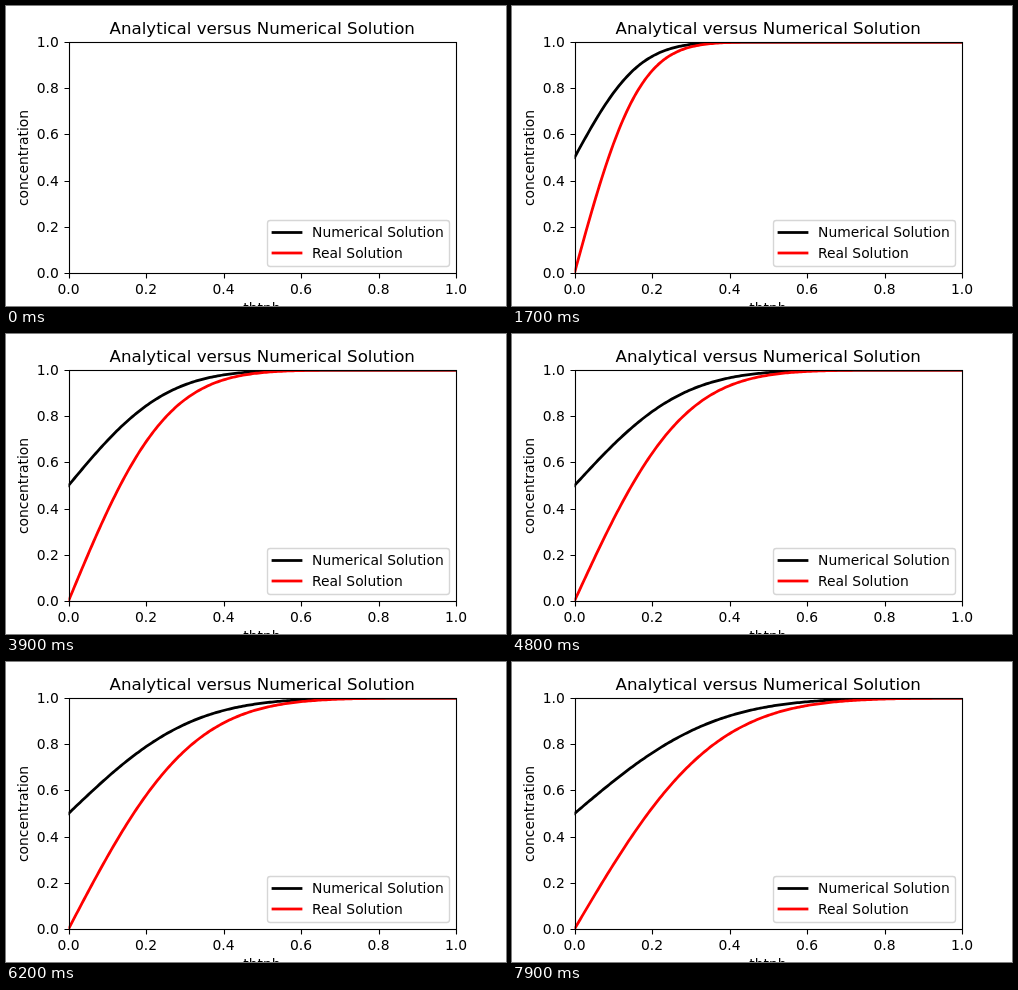
These frames come from a looping animation (500 px wide and 300 px high, 8000 ms). An HTML page:

```html
<!DOCTYPE html>
<html lang="en">
<head>
<meta charset="utf-8">
<title>Analytical versus Numerical Solution</title>
<style>
html, body { margin: 0; width: 100%; height: 100%; overflow: hidden; background: #fff; }
svg { display: block; font: 13.89px "DejaVu Sans", sans-serif; }
.mid { text-anchor: middle; }
.end { text-anchor: end; }
.title { font-size: 16.67px; }
.axis { fill: none; stroke: #000; stroke-width: 1.11; }
.line { fill: none; stroke-width: 2.78; stroke-linecap: square; stroke-linejoin: round; }
.box { fill: #fff; fill-opacity: .8; stroke: #ccc; stroke-opacity: .8; stroke-width: 1.39; }
</style>
</head>
<body>
<svg width="500" height="300" viewBox="0 0 500 300">
  <clipPath id="plot"><rect x="62.5" y="36" width="387.5" height="231"/></clipPath>
  <g clip-path="url(#plot)">
    <path id="numerical" class="line" stroke="#000"/>
    <path id="real" class="line" stroke="#f00"/>
  </g>
  <rect class="axis" x="63.5" y="36.5" width="387" height="231"/>
  <g id="ticks"></g>
  <text class="mid title" x="256.25" y="28">Analytical versus Numerical Solution</text>
  <text class="mid" x="256" y="307">thtnh</text>
  <text class="mid" transform="translate(22 152) rotate(-90)">concentration</text>
  <rect class="box" x="261.5" y="214.5" width="182" height="46" rx="2.78"/>
  <path class="line" stroke="#000" d="M267 226.5H295"/>
  <path class="line" stroke="#f00" d="M267 247H295"/>
  <text x="306" y="231">Numerical Solution</text>
  <text x="306" y="252">Real Solution</text>
</svg>
<script>
const $ = id => document.getElementById(id);
const px = x => 62.5 + 387.5 * x;
const py = y => 267 - 231 * y;

// Error function for z >= 0 (Abramowitz-Stegun 7.1.26)
function erf(z) {
  const t = 1 / (1 + 0.3275911 * z);
  const poly = t * (0.254829592 + t * (-0.284496736 + t * (1.421413741 + t * (-1.453152027 + t * 1.061405429))));
  return 1 - poly * Math.exp(-z * z);
}

function curve(f) {
  let d = "";
  for (let i = 0; i <= 200; i++) {
    const x = i / 200;
    d += `${i ? "L" : "M"}${px(x).toFixed(2)} ${py(f(x)).toFixed(2)}`;
  }
  return d;
}

let ticks = "";
for (let i = 0; i <= 5; i++) {
  const v = i / 5, label = v.toFixed(1);
  const x = Math.round(px(v)) + 0.5, y = Math.round(py(v)) + 0.5;
  ticks += `<path class="axis" d="M${x} 267.5v5M63.5 ${y}h-5"/>
    <text class="mid" x="${px(v)}" y="288">${label}</text>
    <text class="end" x="52.8" y="${Math.round(py(v)) + 5}">${label}</text>`;
}
$("ticks").innerHTML = ticks;

let shown = -1;
function draw() {
  const step = Math.floor(performance.now() % 8000 / 100);
  if (step !== shown) {
    shown = step;
    const width = Math.sqrt(0.002 * step);
    const real = x => erf(x / width);
    $("real").setAttribute("d", step ? curve(real) : "");
    $("numerical").setAttribute("d", step ? curve(x => (1 + real(x)) / 2) : "");
  }
  requestAnimationFrame(draw);
}
draw();
</script>
</body>
</html>
```
